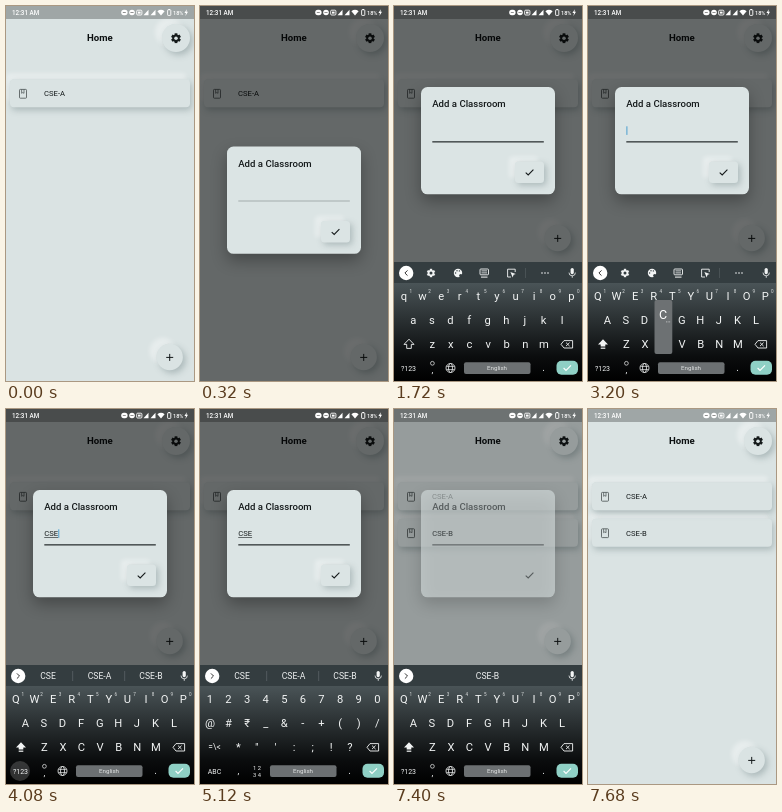
An HTML page with a canvas for the animation above (7760 ms loop, 188 by 375 pixels).

```html
<!DOCTYPE html>
<html lang="en">
<head>
<meta charset="utf-8">
<title>Add a Classroom</title>
<style>
  html, body { margin: 0; width: 100%; height: 100%; overflow: hidden; background: #dae3e3; }
  canvas { display: block; width: 188px; height: 375px; }
</style>
</head>
<body>
<canvas id="stage"></canvas>
<script>
const W = 188, H = 375, LOOP = 7760, STEP = 40, KEYS_H = 119;
const BG = '#dae3e3', INK = '#151a1b', WHITE = '#f2f4f4', BAR = '#343d40';
const canvas = document.getElementById('stage');
const ctx = canvas.getContext('2d');
const dpr = Math.max(1, window.devicePixelRatio || 1);
canvas.width = W * dpr;
canvas.height = H * dpr;

const clamp = v => Math.max(0, Math.min(1, v));
const ramp = (t, a, b) => clamp((t - a) / (b - a));
const within = (t, a, b) => t >= a && t < b;
const easeOut = p => 1 - (1 - p) ** 3;

// Drawing helpers
function text(s, x, y, size, color = INK, weight = 400, align = 'left') {
  ctx.font = `${weight} ${size}px Roboto, "Noto Sans", sans-serif`;
  ctx.textAlign = align;
  ctx.fillStyle = color;
  ctx.fillText(s, x, y);
}
const mid = (s, x, y, size, color = WHITE, weight = 400) => text(s, x, y, size, color, weight, 'center');

function rect(x, y, w, h, color) {
  ctx.fillStyle = color;
  ctx.fillRect(x, y, w, h);
}
function round(x, y, w, h, r) {
  ctx.beginPath();
  ctx.roundRect(x, y, w, h, r);
}
function disc(x, y, r, color) {
  ctx.beginPath();
  ctx.arc(x, y, r, 0, 7);
  ctx.fillStyle = color;
  ctx.fill();
}
function line(pts, color, width = 1, close = false) {
  ctx.beginPath();
  for (let i = 0; i < pts.length; i += 2) ctx.lineTo(pts[i], pts[i + 1]);
  if (close) ctx.closePath();
  ctx.strokeStyle = color;
  ctx.lineWidth = width;
  ctx.stroke();
}
function poly(pts, color) {
  ctx.beginPath();
  for (let i = 0; i < pts.length; i += 2) ctx.lineTo(pts[i], pts[i + 1]);
  ctx.fillStyle = color;
  ctx.fill();
}
function shadow(color, dx, dy, blur) {
  ctx.shadowColor = color;
  ctx.shadowOffsetX = dx * dpr;
  ctx.shadowOffsetY = dy * dpr;
  ctx.shadowBlur = blur * dpr;
}
// Raised surface: light from the top left, shade at the bottom right
function raised(path, dx, dy, color = BG) {
  ctx.save();
  ctx.fillStyle = color;
  path();
  shadow('rgba(255,255,255,.36)', -dx, -dy, 4);
  ctx.fill();
  shadow('rgba(110,128,130,.42)', dx * .4, dy * .5, 6);
  ctx.fill();
  ctx.restore();
}
const raisedDisc = (x, y, r) => raised(() => { ctx.beginPath(); ctx.arc(x, y, r, 0, 7); }, 7, 6);

function gear(x, y, r, color, hole) {
  ctx.save();
  ctx.translate(x, y);
  ctx.fillStyle = color;
  for (let i = 0; i < 3; i++) {
    ctx.fillRect(-r * .28, -r, r * .56, r * 2);
    ctx.rotate(Math.PI / 3);
  }
  ctx.restore();
  disc(x, y, r * .74, color);
  disc(x, y, r * .36, hole);
}

// App page
function card(y, label) {
  raised(() => round(4, y, 180, 28, 4), 4, 6);
  ctx.strokeStyle = '#4a5152';
  ctx.lineWidth = .8;
  round(13.5, y + 10.1, 7, 8.8, .8);
  ctx.stroke();
  line([15.6, y + 10.2, 15.6, y + 14, 16.8, y + 13.2, 18, y + 14, 18, y + 10.2], '#4a5152', .7);
  text(label, 38, y + 17.1, 7.66);
}

function page(t, fabY) {
  rect(0, 0, W, H, BG);
  if (t >= 7320) card(109.7, 'CSE-B');
  card(73.3, 'CSE-A');
  raisedDisc(170, 32, 14);
  gear(170, 32.2, 4.9, INK, BG);
  mid('Home', 93.8, 35.4, 9.6, '#0c1011', 700);
  raisedDisc(163.7, fabY, 13.2);
  rect(160.2, fabY - .1, 7, 1, INK);
  rect(163.2, fabY - 3.1, 1, 7, INK);
  rect(0, 0, W, 13, 'rgba(0,0,0,.27)');
}

function status() {
  text('12:31 AM', 6, 8.8, 6.3, '#fff', 500);
  round(115.2, 3.8, 6.4, 5.4, 2.6);
  ctx.fillStyle = '#fff';
  ctx.fill();
  rect(116.8, 6.1, 3, .8, '#777');
  disc(126, 6.5, 2.8, '#fff');
  rect(124.4, 6.1, 3.2, .8, '#777');
  ctx.strokeStyle = '#fff';
  ctx.lineWidth = .9;
  round(130.7, 4.2, 5.2, 4.8, 1);
  ctx.stroke();
  rect(132, 5.6, 2.6, 2, '#fff');
  for (const x of [137.5, 144.5]) poly([x, 9.3, x + 5, 9.3, x + 5, 3.8], '#fff');
  poly([151.4, 5.2, 153.2, 4, 155, 3.7, 156.8, 4, 158.6, 5.2, 155, 9.5], '#fff');
  round(161.6, 3.8, 3.2, 5.6, .6);
  ctx.stroke();
  rect(162.4, 3, 1.6, 1, '#fff');
  text('18%', 167, 8.8, 5.6, '#fff', 500);
  poly([180.8, 3.2, 178.4, 7, 180, 7, 179.4, 10, 182, 5.8, 180.5, 5.8], '#fff');
}

// Dialog
const entries = [[3280, 'C'], [3440, 'CS'], [3600, 'CSE'], [5520, 'CSE-'], [6600, 'CSE-B']];
const cursorOn = [[1040, 1720], [1960, 2440], [2920, 4200], [4680, 5120], [5520, 6000], [6520, 7120]];

function typed(t) {
  return entries.reduce((s, [at, word]) => t >= at ? word : s, '');
}

function dialog(t, top, alpha) {
  if (alpha <= 0) return;
  const word = typed(t), focus = ramp(t, 960, 1120), closing = t >= 7300;
  ctx.save();
  ctx.globalAlpha = alpha;
  ctx.save();
  shadow('rgba(0,0,0,.3)', 0, 7, 16);
  round(27, top, 134, 107.3, 6.5);
  ctx.fillStyle = '#dbe4e4';
  ctx.fill();
  ctx.restore();
  text('Add a Classroom', 38.2, top + 20.3, 9.6, INK, 500);
  text(word, 38.2, top + 45.8, 7.66);
  const w = ctx.measureText(word).width;
  if (word && !closing) rect(38.2, top + 47, w, .6, INK);
  if (cursorOn.some(([a, b]) => within(t, a, b))) rect(38.4 + w, top + 39.3, 1, 8.6, '#4b9fd0');
  rect(38.3, top + 54.2, 111.5, .6 + .7 * focus, focus ? '#303637' : '#7f8788');
  if (!closing) raised(() => round(121, top + 74.5, 29, 21.5, 3.5), 6, 5, '#dbe4e4');
  line([131.7, top + 85.6, 134.2, top + 88, 139.4, top + 82.7], INK, 1.1);
  ctx.restore();
}

// Keyboard
const rowY = [290, 314, 338];
const layouts = {
  letters: ['qwertyuiop', 'asdfghjkl', 'zxcvbnm'],
  symbols: ['1234567890', '@#₹_&-+()/', '*"\':;!?']
};
const keyX = (row, i, count) => (row === 2 ? 38.3 : count === 9 ? 19.3 : 9.9) + 18.6 * i;
const presses = [
  [3200, 3280, 'C', 75.5, 338], [3400, 3480, 'S', 37.9, 314], [3560, 3640, 'E', 47.1, 290],
  [5480, 5560, '-', 102.9, 314], [6560, 6680, 'B', 112.7, 338]
];
const taps = [[1960, 2040, 15, 338], [2200, 2280, 15, 338], [4080, 4160, 14, 362], [5920, 6000, 14, 362]];

function toolbar() {
  gear(37, 267, 4.2, WHITE, BAR);
  disc(64, 267, 4.2, WHITE);
  disc(66.8, 269.6, 1.7, BAR);
  for (const [x, y] of [[61.6, 267], [63, 264.7], [65.4, 264.9]]) disc(x, y, .7, BAR);
  ctx.strokeStyle = WHITE;
  ctx.lineWidth = .9;
  round(86, 263, 8.5, 5.8, .8);
  ctx.stroke();
  rect(87.5, 264.5, 5.5, .8, WHITE);
  rect(87.5, 266.5, 5.5, .8, WHITE);
  rect(87, 270.6, 6.5, 1, WHITE);
  line([117, 271, 113.6, 271, 113.6, 263.2, 121.2, 263.2, 121.2, 266], WHITE, .9);
  poly([116.4, 266, 121.8, 268, 119.6, 268.8, 118.7, 271.4], WHITE);
  rect(131, 262, .6, 10, '#596265');
  for (const x of [148, 151, 154]) disc(x, 267, .8, WHITE);
}

function suggestions(word) {
  const y = 270, size = 8.6;
  if (word === 'CSE-B') return mid(word, 93.5, y, size);
  const more = { C: ['CSE', 'CSE-A'], CS: ['CSE', 'CSE-A'] }[word] || ['CSE-A', 'CSE-B'];
  [word, ...more].forEach((s, i) => mid(s, 42 + 51.5 * i, y, size));
  for (const x of [66.5, 118.5]) rect(x, 262, .6, 10, '#666f72');
}

function shiftKey(on, locked) {
  const foot = locked ? 340.4 : 342.4;
  const p = [15, 333.2, 20, 338.4, 17.3, 338.4, 17.3, foot, 12.7, foot, 12.7, 338.4, 10, 338.4];
  if (on) poly(p, WHITE);
  else line(p, WHITE, .9, true);
  if (locked) rect(12.7, 341.6, 4.6, 1.2, WHITE);
}

function backspace() {
  line([170, 334.6, 178.6, 334.6, 178.6, 342, 170, 342, 167, 338.3], WHITE, .9, true);
  line([172, 336.6, 175.6, 340.1], WHITE, .9);
  line([175.6, 336.6, 172, 340.1], WHITE, .9);
}

function bottomRow(symbols) {
  mid(symbols ? 'ABC' : '?123', 14.5, 364.6, 7);
  if (symbols) {
    mid(',', 38.5, 364.5, 9);
    mid('1 2', 57, 361.2, 5.8);
    mid('3 4', 57, 367.6, 5.8);
  } else {
    mid(',', 38.5, 366.5, 9);
    ctx.strokeStyle = WHITE;
    ctx.lineWidth = .7;
    ctx.beginPath();
    ctx.arc(38.4, 357.3, 1.9, 0, 7);
    ctx.stroke();
    ctx.lineWidth = .8;
    for (const rx of [4.5, 2]) {
      ctx.beginPath();
      ctx.ellipse(56.5, 362, rx, 4.5, 0, 0, 7);
      ctx.stroke();
    }
    line([52.4, 360.4, 60.6, 360.4], WHITE, .7);
    line([52.4, 363.6, 60.6, 363.6], WHITE, .7);
  }
  round(70, 356.3, 66.5, 11.6, 2);
  ctx.fillStyle = '#6c7072';
  ctx.fill();
  mid('English', 103, 364.2, 6.2, '#e4e6e6');
  mid('.', 149.5, 364.5, 10);
  round(162.5, 354.8, 21.5, 14, 5);
  ctx.fillStyle = '#8fd0c5';
  ctx.fill();
  line([169.6, 362, 172, 364.4, 177, 359.4], '#fff', 1.1);
}

function keyboard(t, drop) {
  if (drop >= KEYS_H) return;
  const symbols = within(t, 4120, 5960), upper = t >= 2080, word = typed(t);
  ctx.save();
  ctx.translate(0, drop);
  const shade = ctx.createLinearGradient(0, 277, 0, H);
  shade.addColorStop(0, '#4a5457');
  shade.addColorStop(.75, '#0b0d0e');
  shade.addColorStop(1, '#000');
  rect(0, 256, W, 21.5, BAR);
  rect(0, 277, W, 98, shade);

  for (const [a, b, x, y] of taps) if (within(t, a, b)) disc(x, y, 10, 'rgba(255,255,255,.18)');
  disc(12.2, 267, 7.2, '#fff');
  const d = word ? 1 : -1;
  line([12.2 - d * 1.3, 264.4, 12.2 + d * 1.3, 267, 12.2 - d * 1.3, 269.6], '#333', 1);
  if (word) suggestions(word); else toolbar();
  round(176.6, 262, 3.2, 6.2, 1.6);
  ctx.fillStyle = WHITE;
  ctx.fill();
  ctx.beginPath();
  ctx.arc(178.2, 266.6, 3.2, 0, Math.PI);
  ctx.strokeStyle = WHITE;
  ctx.lineWidth = .8;
  ctx.stroke();
  rect(177.8, 269.8, .8, 2, WHITE);

  layouts[symbols ? 'symbols' : 'letters'].forEach((keys, row) => {
    [...keys].forEach((key, i) => {
      const x = keyX(row, i, keys.length), y = rowY[row];
      mid(upper ? key.toUpperCase() : key, x, y + 4.1, 11.2);
      if (!symbols && row === 0) mid((i + 1) % 10, x + 7, y - 3.4, 4.6, '#dfe2e2');
    });
  });
  if (symbols) mid('=\\<', 14.5, 341, 8.4); else shiftKey(upper, t >= 2280);
  backspace();
  bottomRow(symbols);

  for (const [a, b, key, x, y] of presses) {
    if (!within(t, a, b)) continue;
    round(x - 9, y - 44, 17.8, 54, 2);
    ctx.fillStyle = '#6d7173';
    ctx.fill();
    mid(key, x - .5, y - 25.5, 12.5, '#fff');
    for (let i = 0; i < 3; i++) rect(x + 2.6 + i * 1.6, y - 22.5, .8, .8, '#e0e2e2');
  }
  ctx.restore();
}

function draw(t) {
  ctx.setTransform(dpr, 0, 0, dpr, 0, 0);
  const shown = easeOut(ramp(t, 100, 310)) * (1 - ramp(t, 7300, 7540));
  const lift = ramp(t, 1320, 1400);
  const drop = KEYS_H * (1 - easeOut(ramp(t, 1400, 1720)) + ramp(t, 7400, 7660) ** 2);
  page(t, within(t, 1360, 7440) ? 232 : 351);
  rect(0, 0, W, H, `rgba(0,0,0,${.54 * shown})`);
  status();
  dialog(t, 140.5 - 59.5 * lift, shown);
  keyboard(t, drop);
}

const start = performance.now();
function frame() {
  const t = (performance.now() - start) % LOOP;
  draw(Math.floor(t / STEP) * STEP);
  requestAnimationFrame(frame);
}
frame();
</script>
</body>
</html>
```
